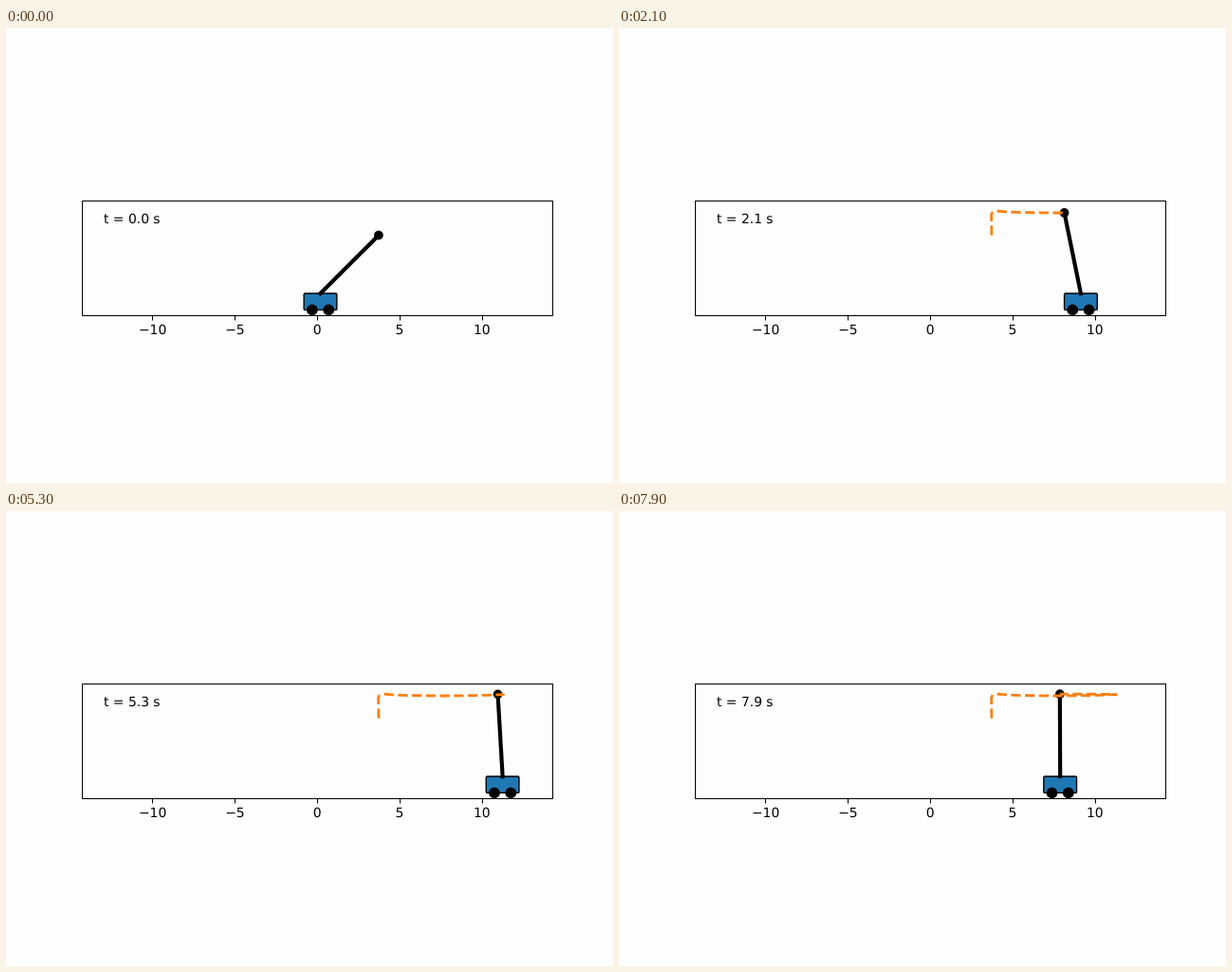
An HTML page for the animation above (8 s loop, 640x480 px).

```html
<!DOCTYPE html>
<html lang="en">
<head>
<meta charset="utf-8">
<title>Cart and pole</title>
<style>
  html, body { margin: 0; width: 100%; height: 100%; overflow: hidden; background: #fefefe; }
  svg { display: block; width: 640px; height: 480px; }
  text { font: 13.89px "DejaVu Sans", sans-serif; text-rendering: geometricPrecision; white-space: pre; }
</style>
</head>
<body>
<svg viewBox="0 0 640 480">
  <g id="axis"></g>
  <g stroke="#000" stroke-width="1.39">
    <rect id="cart" y="280" width="34.72" height="17.36" rx="1.2" fill="#1f77b4"/>
    <circle id="rear" cy="297.4" r="5.21"/>
    <circle id="front" cy="297.4" r="5.21"/>
  </g>
  <line id="pole" y1="280" stroke="#000" stroke-width="4.17" stroke-linecap="square"/>
  <circle id="bob" r="4.86"/>
  <polyline id="trace" fill="none" stroke="#ff7f0e" stroke-width="2.78"
    stroke-dasharray="10.28 4.44" stroke-linejoin="round"/>
  <rect x="80.5" y="182.5" width="496" height="121" fill="none" stroke="#000"/>
  <text id="clock" x="103" y="206"></text>
</svg>
<script>
const UNIT = 17.36, ORIGIN = 328, PIVOT_Y = 280, POLE = 5 * UNIT;
const STEP = 100, LOOP = 8000;
const PEAK_TIME = 4.2, PEAK_KEY = 8;
const el = id => document.getElementById(id);
const set = (id, attrs) => {
  for (const name in attrs) el(id).setAttribute(name, attrs[name]);
};

// Key positions, spaced evenly in the square root of time; both peak at PEAK_KEY
const cartKeys = [331.5, 332.1, 339.8, 366.5, 412.8, 459.8, 499, 525, 532.9, 523.4, 498.6, 464.2];
const tipKeys = [392.9, 392.9, 392.8, 392.6, 405, 443, 482.4, 512.4, 524.5, 518.4, 496.4, 463.9];

// Geometric mean of the neighbouring rates, flat where the direction turns
function slope(keys, i) {
  const before = keys[i] - keys[i - 1], after = keys[i + 1] - keys[i];
  if (i === 0) return 0;
  if (i === keys.length - 1) return before;
  return Math.sign(after) * Math.sqrt(Math.max(0, before * after));
}

function curve(keys, seconds) {
  const u = PEAK_KEY * Math.sqrt(seconds / PEAK_TIME);
  const i = Math.min(Math.floor(u), keys.length - 2), s = u - i, r = 1 - s;
  return r * r * (1 + 2 * s) * keys[i] + s * s * (3 - 2 * s) * keys[i + 1]
    + s * r * (r * slope(keys, i) - s * slope(keys, i + 1));
}

const poses = Array.from({ length: LOOP / STEP }, (_, i) => {
  const t = i * STEP / 1000, x = curve(cartKeys, t), tipX = curve(tipKeys, t);
  return { x, tipX, tipY: PIVOT_Y - Math.sqrt(POLE ** 2 - (tipX - x) ** 2) };
});

for (let v = -10; v <= 10; v += 5) {
  const x = ORIGIN + v * UNIT;
  el("axis").insertAdjacentHTML("beforeend",
    `<path d="M${Math.round(x) + 0.5} 303.5v5" stroke="#000"/>` +
    `<text x="${x + 0.2}" y="323" text-anchor="middle">${String(v).replace("-", "\u2212")}</text>`);
}

function draw(ms) {
  const i = Math.floor((ms % LOOP) / STEP), { x, tipX, tipY } = poses[i];
  set("cart", { x: x - UNIT });
  set("rear", { cx: x - UNIT / 2 });
  set("front", { cx: x + UNIT / 2 });
  set("pole", { x1: x, x2: tipX, y2: tipY });
  set("bob", { cx: tipX, cy: tipY });
  const path = i ? poses.slice(0, i + 1) : [];
  set("trace", { points: path.map(p => `${p.tipX},${p.tipY}`).join(" ") });
  el("clock").textContent = `t = ${(i / 10).toFixed(1)} s`;
}

let start;
function tick(now) {
  start ??= now;
  draw(now - start);
  requestAnimationFrame(tick);
}
draw(0);
requestAnimationFrame(tick);
</script>
</body>
</html>
```
